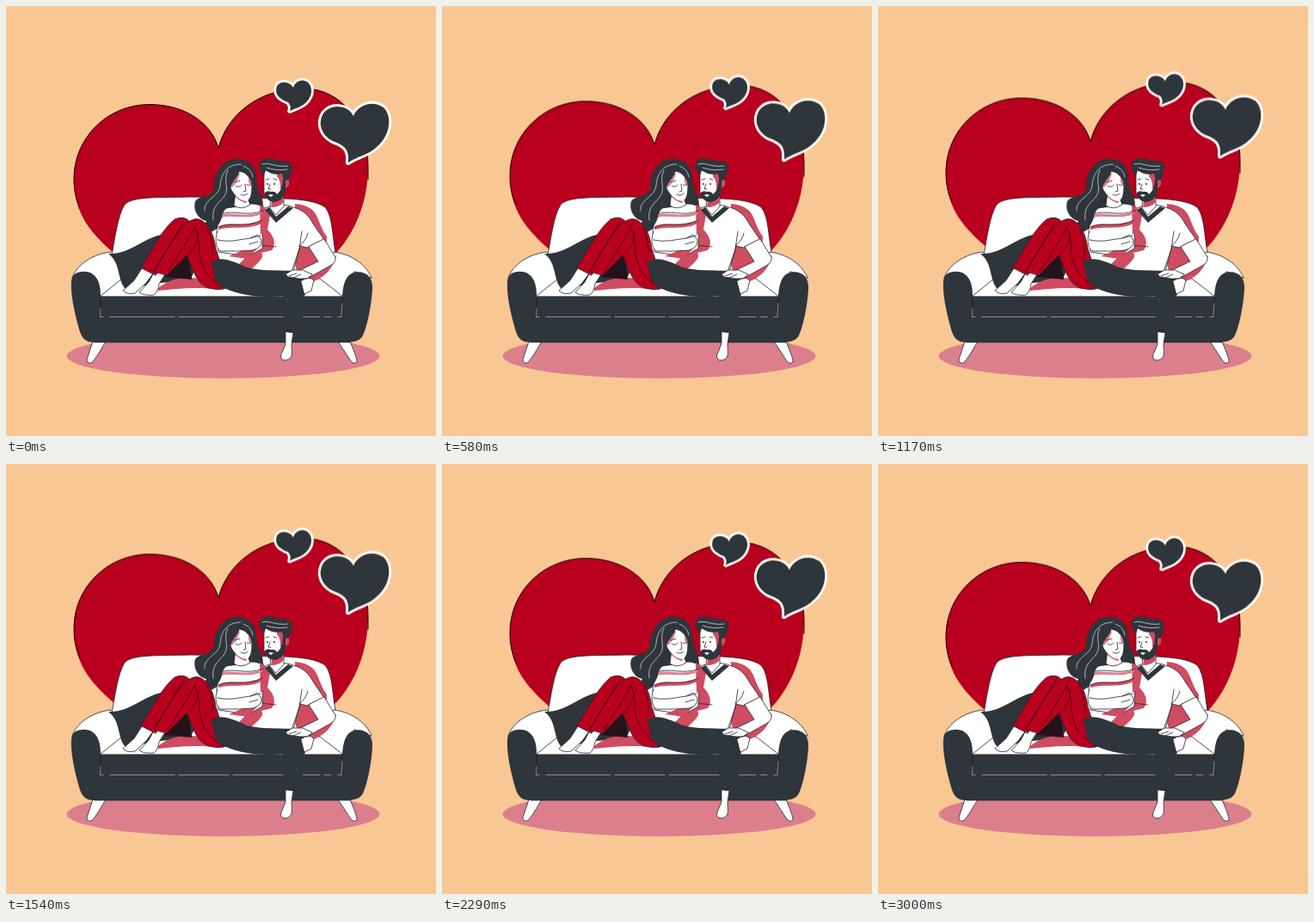
Write an HTML page that moves like this. It is 500 by 500 pixels and loops after 3040 ms.

```html
<!DOCTYPE html>
<html lang="en">
<head>
<meta charset="utf-8">
<title>Couple on a sofa</title>
<style>
html, body { margin: 0; width: 100%; height: 100%; overflow: hidden; background: #f9c794; }
svg { display: block; width: 100vw; height: 100vh; }
path, ellipse { stroke-linecap: round; stroke-linejoin: round; }
.dark { fill: #2e353b; }
.white { fill: #fff; }
.red { fill: #b9001e; }
.pink { fill: #dc7f8d; }
.rose { fill: #cf4c61; }
.ink { stroke: #20262b; stroke-width: .8; }
.line { fill: none; stroke: #20262b; stroke-width: .8; }
.shine { fill: none; stroke: #d5d6d8; stroke-width: .8; }
.badge { fill: #2e353b; stroke: #fff8f2; stroke-width: 6; paint-order: stroke; }
.float { animation: rise 1520ms linear infinite alternate; }
@keyframes rise { to { transform: translateY(-9.8px); } }
</style>
</head>
<body>
<svg viewBox="0 0 500 500">
  <ellipse class="pink" cx="252.500" cy="407" rx="182" ry="26"/>

  <g class="float">
    <path class="red" d="M247 165C239 136 208 114.500 167 114.500C118 114.500 79 153 79 201C79 239 96 262 125 287L250 378L384 287C407 262 421 226 421 187C421 137 391 96 346 96C293 96 257 127 247 165Z"/>
    <path class="line" style="stroke:#100;stroke-width:1" d="M86 235C81 224 79 214 79 201C79 153 118 114.500 167 114.500C208 114.500 239 136 247 165C257 127 293 96 346 96C391 96 421 137 421 187V202"/>
  </g>

  <!-- sofa -->
  <g>
    <path class="white ink" d="M123 290C127 268 130 244 138 231C147 221 178 223 215 222L325 224C344 225 361 227 371 234C380 245 379 266 384 292L370 325H130Z"/>
    <path class="white ink" d="M77 316C83 299 103 288 122 286L134 300L137 317L110 338L98 311Z"/>
    <path class="white ink" d="M425 316C419 300 400 288 381 286L366 306L364 318L391 338L405 309Z"/>
    <path class="white ink" d="M109 338L135 317H365L392 338Z"/>
    <path class="white ink" d="M101 390L94 411Q94 416 99 415Q103 413 116 390ZM386 390L401 413Q405 417 408 414Q409 411 400 390Z"/>
    <path class="dark" d="M76 320C77 309 88 307 98 310C108 315 110 326 110 337.500H391C392 323 395 313 404 310C418 307 427 315 426 329C425 348 420 373 415 383C412 389 405 391 397 391H102C93 391 89 387 86 379C79 355 75 335 76 320Z"/>
    <path class="line" style="stroke:#161b20" d="M110 338V360M391 338V360M103 391H400"/>
    <path class="shine" style="stroke:#a8a9ab" d="M110 352L109.500 361.500H113M121 361.500H196M201 361.500H259M264 361.500H365M370 361.500H378M386 361.500H390L391 346"/>
  </g>

  <!-- throw and shadow on the seat -->
  <path class="dark" d="M119 288C145 289 159 269 185 265L207 257L230 285L214 319L180 322L139 329C129 319 134 299 119 288Z"/>
  <path class="rose" d="M177 328C191 316 208 315 222 317L249 330C222 326 198 329 177 331Z"/>
  <path fill="#24131a" d="M184 315L212 286L216 318Z"/>

  <!-- man: shadow on the sofa, torso -->
  <path class="rose" d="M336 230Q349 231 356 237C364 244 364 256 373 268L372 297L384 291C380 305 371 315 358 320L350 334L343 326L336 300Z"/>
  <path class="white ink" d="M301 235C309 231 326 230 334 234C345 237 352 243 357 253L370 272L350 281L342 279L334 309L281 307L292 284Z"/>
  <path class="rose" d="M297 229L307 243L304 260C311 267 315 276 309 284L297 287C301 292 294 298 284 307L270 301L289 282Z"/>
  <path class="line" d="M344 262L341 283L332 309M295 278L314 280M341 279Q349 273 351 264"/>
  <path class="white ink" d="M370 271L383 292Q384 298 377 302L350 317L340 308L363 297L352 280Z"/>
  <path class="white ink" d="M308 221L307 235L314 243L323 233V222Z"/>
  <path class="rose" d="M309 227Q318 229 323 221L323 228Q318 234 308 234Z"/>
  <path class="dark" d="M301 237L306 234L314 245L328 233L334 235L314 252Z"/>

  <!-- man: head -->
  <path class="white ink" d="M300 193V217Q304 228 313 227Q322 224 325 211Q330 210 329 203L325 198V191H302Z"/>
  <path class="rose" d="M315 193H323V212L319 213Q320 203 315 198ZM324 202Q331 201 329 208Q327 212 324 211Z"/>
  <path class="dark" d="M301 217Q304 214 308 216Q313 215 315 219Q321 215 322 202L325 198L325 214Q323 227 312 228Q304 227 301 220Z"/>
  <path class="dark" d="M300 197C294 192 292 182 298 179C305 175 311 178 317 180C325 180 333 181 333 187C331 194 332 199 327 203L323 203L321 195C314 197 307 195 302 191Z"/>
  <path class="shine" d="M298 184C307 181 312 188 328 186M303 188Q314 192 327 190"/>
  <path class="line" d="M302 202L306 201M311 201L315 202M307 207L305 213L308 213"/>
  <path class="white" d="M305 220Q308 218 311 220L308 222Z"/>
  <circle class="dark" cx="304" cy="207" r="1"/>
  <circle class="dark" cx="312" cy="207" r="1"/>

  <!-- woman: hair behind, torso, face -->
  <path class="dark" d="M265 178C281 176 291 186 291 200C291 213 299 218 299 233L285 235L252 240C252 250 249 259 238 263C228 262 229 256 233 250C223 248 217 237 220 227C226 219 239 224 242 211C240 199 251 179 265 178Z"/>
  <path class="white ink" d="M249 239C256 232 266 236 272 231L286 230Q297 230 299 237L298 282L282 291L247 286L245 262Z"/>
  <path class="rose" d="M295 231Q301 233 300 240V263L296 266ZM247 257C260 249 272 259 297 249V253C279 261 265 255 247 260ZM278 283L293 281L281 294L259 291Z"/>
  <path class="pink" d="M250 243C263 238 279 247 298 239L297 242C280 249 265 242 249 246Z"/>
  <path class="line" d="M250 242C264 236 280 246 299 238M247 257C262 250 277 259 298 249"/>
  <path class="white ink" d="M246 262C243 270 243 280 249 285L270 285L287 284Q298 281 297 272L292 266L284 270L264 273Q253 274 246 272"/>
  <path class="line" d="M284 270L296 267M283 277L293 274"/>
  <path class="white ink" d="M267 216L265 232Q273 238 284 231L280 221Z"/>
  <path class="rose" d="M268 215L281 225L279 229Q272 227 267 222Z"/>
  <path class="white" d="M264 194C272 190 280 194 285 203Q287 225 279 227C270 226 263 217 260 208Z"/>
  <path class="pink" d="M259 213C266 210 270 202 272 195L265 193L258 202ZM282 196L286 202L285 210L282 205Z"/>
  <path class="line" d="M267 209Q271 212 274 208M280 208Q282 210 285 207M278 207L279 215L276 216M273 219Q277 222 281 218M266 205L272 203"/>
  <path class="dark" d="M265 179C279 177 291 186 291 201L287 214C287 203 280 194 272 191C269 202 257 208 262 219C267 230 252 234 251 246C247 260 237 262 233 252L237 233L246 208L250 191Z"/>
  <path class="shine" d="M273 184C256 184 250 196 249 209C247 223 229 225 231 238M258 191C252 202 260 212 254 221C246 231 239 234 241 249M276 186Q286 190 287 199"/>

  <!-- woman: legs -->
  <path class="white ink" d="M158 305L149 319L136 331Q141 336 150 334L163 322L171 311Z"/>
  <path class="white ink" d="M173 308L166 321L155 333Q160 337 172 336Q177 332 178 323L185 312Z"/>
  <path class="red ink" d="M157 304C168 287 181 260 196 248Q207 243 214 251L203 272L174 313Z"/>
  <path class="red ink" d="M172 309C184 289 197 263 212 251Q222 244 230 251C239 258 242 270 244 282L258 326Q255 331 241 329C221 327 218 306 210 290L187 313Z"/>
  <path class="line" style="stroke:#41000d" d="M207 251C197 267 185 287 172 308M222 252C215 267 205 283 188 309M220 259C227 270 222 287 228 300C232 313 241 319 253 328M211 289Q222 282 224 263M234 258Q242 276 240 293"/>

  <!-- man: trousers, hand, foot -->
  <path class="dark" d="M238 298C249 290 263 296 280 304C300 309 317 307 338 308C349 313 352 328 345 344V379H323L322 337C296 340 268 336 250 326C239 318 243 307 238 298Z"/>
  <path class="white ink" d="M350 317L341 317L328 315L325 312L333 307L345 307L356 312ZM343 320Q352 313 358 319L355 331L347 335Z"/>
  <path class="line" d="M329 314L338 311M334 316L343 312"/>
  <path class="white ink" d="M325 379L325 393L320 405Q318 412 325 412Q332 411 332.500 404L332 393L334 380Z"/>

  <g class="float">
    <path class="badge" style="stroke-width:5.500" d="M334 95C331 88 319 86 315 93C312 102 317 108 328 112Q332 116 330 122C336 119 343 118 349 112C357 104 357 93 350 88C343 84 336 88 334 95Z"/>
    <path class="badge" d="M404 128C398 115 378 113 369 125C362 137 367 149 378 156C388 161 400 162 398 182C407 175 421 174 432 163C446 151 450 129 439 118C426 109 409 115 404 128Z"/>
  </g>
</svg>
</body>
</html>
```
